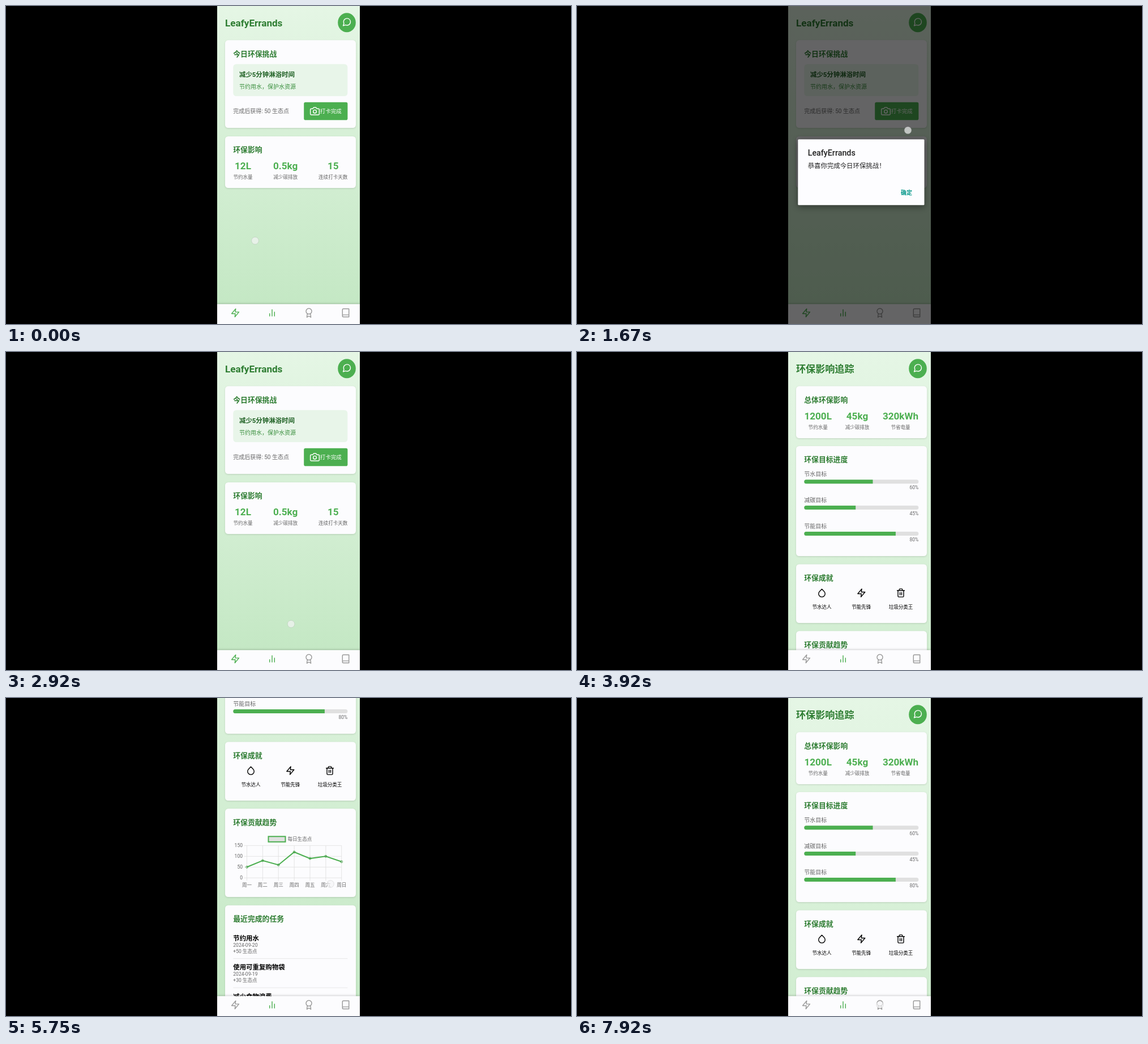
Animation, 998 px wide and 561 px high, one loop 8000 ms. Source, as an HTML page:

```html
<!DOCTYPE html>
<html lang="zh-CN">
<head>
<meta charset="utf-8">
<title>环保挑战</title>
<style>
html, body { margin: 0; width: 100%; height: 100%; overflow: hidden; background: #000; }
svg { display: block; width: 998px; height: 561px; }
text { font-family: Roboto, "Noto Sans CJK SC", "Noto Sans CJK JP", sans-serif; white-space: pre; }
.icon { fill: none; stroke-width: 2; stroke-linecap: round; stroke-linejoin: round; }
.card { fill: #fcfcfe; filter: drop-shadow(0 1.4px 1.5px rgba(0,0,0,.13)); }
.nav { fill: #fcfcfe; filter: drop-shadow(0 -1.4px 1.5px rgba(0,0,0,.12)); }
.alert { fill: #fdfdff; filter: drop-shadow(0 3px 6px rgba(0,0,0,.4)); }
</style>
</head>
<body>
<svg id="stage" viewBox="0 0 998 561"></svg>
<script>
const APP = 'LeafyErrands';
const GREEN = '#4CAF50', DARK = '#2E7D32', GRAY = '#666';
const SCALE = 0.7135, H1 = 17.1, H2 = 12.84, BODY = 11.42, SMALL = 10, TINY = 8.56;
const LOOP = 8000, SCROLL = 297;

const ICONS = {
  zap: 'M13 2L3 14h9l-1 8 10-12h-9l1-8z',
  bars: 'M18 20V10M12 20V4M6 20v-6',
  award: 'M19 8a7 7 0 1 1-14 0a7 7 0 1 1 14 0zM8.21 13.89L7 23l5-3 5 3-1.21-9.12',
  book: 'M4 19.5A2.5 2.5 0 0 1 6.5 17H20M6.5 2H20v20H6.5A2.5 2.5 0 0 1 4 19.5v-15A2.5 2.5 0 0 1 6.5 2z',
  chat: 'M21 11.5a8.38 8.38 0 0 1-.9 3.8 8.5 8.5 0 0 1-7.6 4.7 8.38 8.38 0 0 1-3.8-.9L3 21l1.9-5.7a8.38 8.38 0 0 1-.9-3.8 8.5 8.5 0 0 1 4.7-7.6 8.38 8.38 0 0 1 3.8-.9h.5a8.48 8.48 0 0 1 8 8v.5z',
  camera: 'M23 19a2 2 0 0 1-2 2H3a2 2 0 0 1-2-2V8a2 2 0 0 1 2-2h4l2-3h6l2 3h4a2 2 0 0 1 2 2zM16 13a4 4 0 1 1-8 0a4 4 0 1 1 8 0z',
  drop: 'M12 2.69l5.66 5.66a8 8 0 1 1-11.31 0z',
  trash: 'M3 6h18M19 6v14a2 2 0 0 1-2 2H7a2 2 0 0 1-2-2V6m3 0V4a2 2 0 0 1 2-2h4a2 2 0 0 1 2 2v2M10 11v6M14 11v6'
};

// Text is placed by the vertical centre of its line.
const text = (s, x, y, size, fill = GRAY, weight = 400, anchor = 'start') =>
  `<text x="${x}" y="${y + size * 0.37}" font-size="${size}" fill="${fill}" font-weight="${weight}" text-anchor="${anchor}">${s}</text>`;
const rect = (x, y, w, h, r, attrs) =>
  `<rect x="${x}" y="${y}" width="${w}" height="${h}" rx="${r}" ${attrs}/>`;
const icon = (name, x, y, color) =>
  `<path class="icon" stroke="${color}" transform="translate(${x} ${y}) scale(${SCALE}) translate(-12 -12)" d="${ICONS[name]}"/>`;
const line = (x1, y1, x2, y2, color) =>
  `<path d="M${x1} ${y1}L${x2} ${y2}" stroke="${color}" stroke-width=".75"/>`;
const card = (top, bottom, title) =>
  rect(387, top, 231, bottom - top, 5.5, 'class="card"') + text(title, 401.3, top + 23.7, H2, DARK, 700);
const header = title =>
  text(title, 387, 29.7, H1, DARK, 700) +
  `<ellipse cx="602" cy="29.2" rx="15.8" ry="17" fill="${GREEN}"/>` + icon('chat', 602, 28.3, '#fff');
const stat = ([value, label, x], y) =>
  text(value, x, y, H1, GREEN, 700, 'middle') + text(label, x, y + 19.6, TINY, GRAY, 400, 'middle');
const backdrop = height => rect(373, 0, 252, height, 0, 'fill="url(#leaf)"');

function homePage() {
  const stats = [['12L', '节约水量', 418.5], ['0.5kg', '减少碳排放', 493.7], ['15', '连续打卡天数', 577.7]];
  return backdrop(561) + header(APP) +
    card(60.3, 215, '今日环保挑战') +
    rect(401.3, 102.5, 202, 56.5, 5.5, 'fill="#E8F5E9"') +
    text('减少5分钟淋浴时间', 412, 121, BODY, '#1B5E20', 700) +
    text('节约用水，保护水资源', 412, 142, SMALL, '#388E3C') +
    text('完成后获得: 50 生态点', 401.3, 185.5, SMALL) +
    rect(526.2, 169.8, 77.2, 31.4, 2.8, `fill="${GREEN}"`) +
    icon('camera', 545.5, 185.5, '#fff') +
    text('打卡完成', 554.8, 185.7, 9.5, '#fff') +
    card(230, 321, '环保影响') +
    stats.map(s => stat(s, 282)).join('');
}

function goal(label, percent, y) {
  const width = 202, end = width * percent / 100;
  return text(label, 401.3, y, SMALL) +
    rect(401.3, y + 10, width, 7, 3.5, 'fill="#e0e0e0"') +
    `<path fill="${GREEN}" d="M${401.3 + end} ${y + 10}v7H404.8a3.5 3.5 0 0 1 0 -7z"/>` +
    text(percent + '%', 603.3, y + 23.5, TINY, GRAY, 400, 'end');
}

function chart(top) {
  const left = 425.5, right = 592.7, base = top + 122, step = (right - left) / 6, grid = '#dcdcdc';
  const points = [50, 80, 60, 120, 90, 100, 75].map((v, i) => [left + step * i, base - v * 0.38]);
  let out = rect(463.5, top + 49, 30, 9.5, 0, `fill="#e0e0e0" stroke="${GREEN}" stroke-width="2"`) +
    text('每日生态点', 497.5, top + 53.5, TINY);
  for (let v = 0; v <= 150; v += 50) {
    const y = base - v * 0.38;
    out += line(left - 5, y, right, y, grid) + text(v, 418, y, TINY, GRAY, 400, 'end');
  }
  points.forEach(([x], i) => {
    out += line(x, base - 57, x, base + 5, grid) +
      text('周' + '一二三四五六日'[i], x, base + 12.3, TINY, GRAY, 400, 'middle');
  });
  out += `<polyline points="${points.join(' ')}" fill="none" stroke="${GREEN}" stroke-width="2"/>`;
  return out + points.map(([x, y]) =>
    `<circle cx="${x}" cy="${y}" r="2" fill="#00000019" stroke="${GREEN}" stroke-width=".8"/>`).join('');
}

function impactPage() {
  const stats = [['1200L', '节约水量', 425.7], ['45kg', '减少碳排放', 495], ['320kWh', '节省电量', 571.5]];
  const goals = [['节水目标', 60], ['减碳目标', 45], ['节能目标', 80]];
  const badges = [['drop', '节水达人', 432.5], ['zap', '节能先锋', 502.3], ['trash', '垃圾分类王', 572]];
  const tasks = [['节约用水', 20, 50], ['使用可重复购物袋', 19, 30], ['减少食物浪费', 18, 40]];
  return backdrop(940) + header('环保影响追踪') +
    card(60.3, 152, '总体环保影响') + stats.map(s => stat(s, 113)).join('') +
    card(166, 360, '环保目标进度') + goals.map(([s, p], i) => goal(s, p, 215.2 + 45.9 * i)).join('') +
    card(374.5, 478, '环保成就') +
    badges.map(([name, label, x]) =>
      icon(name, x, 425, '#000') + text(label, x, 450, TINY, '#000', 400, 'middle')).join('') +
    card(492.3, 648, '环保贡献趋势') + chart(492.3) +
    card(662.7, 874, '最近完成的任务') +
    tasks.map(([name, day, gain], i) => {
      const y = 720.5 + 51.4 * i;
      return text(name, 401.3, y, BODY, '#000', 700) +
        text('2024-09-' + day, 401.3, y + 12.3, TINY) +
        text(`+${gain} 生态点`, 401.3, y + 23.3, TINY) +
        line(401.3, y + 36.2, 603.3, y + 36.2, '#e0e0e0');
    }).join('');
}

const stage = document.getElementById('stage');
stage.innerHTML = `
  <defs><linearGradient id="leaf" x2="0" y2="1">
    <stop stop-color="#E5F6E5"/><stop offset="1" stop-color="#C2E7C2"/>
  </linearGradient></defs>
  <g id="home">${homePage()}</g>
  <g id="impact">${impactPage()}</g>
  ${rect(373, 526, 252, 35, 0, 'class="nav"')}
  <g id="zapTab">${icon('zap', 405, 541.3, 'currentColor')}</g>
  ${icon('bars', 470, 541.3, GREEN)}${icon('award', 535, 541.3, '#999')}${icon('book', 600, 541.3, '#999')}
  <g id="dialog">
    ${rect(373, 0, 252, 561, 0, 'fill="#000" opacity=".6"')}
    ${rect(390.3, 235.3, 223.2, 116, 1.5, 'class="alert"')}
    ${text(APP, 407.7, 258.3, 14.27, '#212121', 500)}
    ${text('恭喜你完成今日环保挑战！', 407.7, 281.3, BODY, '#212121')}
    ${text('确定', 572, 329.7, SMALL, '#009688', 700)}
  </g>
  <circle id="touch" r="6.3" fill="#f4f4f6" fill-opacity=".68" stroke="#888" stroke-opacity=".3" stroke-width=".7"/>`;
const [home, impact, zapTab, dialog, touch] =
  ['home', 'impact', 'zapTab', 'dialog', 'touch'].map(id => document.getElementById(id));

// Keys are [time, ...values], joined by smooth steps.
function track(keys, t) {
  const next = keys.findIndex(k => k[0] > t);
  if (next < 0) return keys[keys.length - 1].slice(1);
  if (!next) return keys[0].slice(1);
  const a = keys[next - 1], b = keys[next], p = (t - a[0]) / (b[0] - a[0]), e = p * p * (3 - 2 * p);
  return a.slice(1).map((v, i) => v + (b[i + 1] - v) * e);
}

const touchKeys = [
  [250, 440, 414], [1000, 584.5, 196], [1500, 584.5, 196], [2150, 584.5, 332], [2600, 584.5, 332],
  [3100, 470, 541], [3500, 470, 541], [4350, 560, 440], [4900, 573, 200],
  [5300, 573, 200], [5650, 573, 328], [5850, 573, 328], [6250, 573, 480],
  [6800, 573, 480], [7500, 535, 541]
];
const touchFade = [[3500, 1], [3700, 0], [4200, 0], [4350, 1], [6250, 1], [6400, 0], [6800, 0], [7000, 1]];
const scrollKeys = [[4400, 0], [5150, SCROLL], [5830, SCROLL], [6400, 0]];
const dialogKeys = [[1420, 0], [1580, 1], [2590, 1], [2720, 0]];

function draw(now) {
  const t = now % LOOP, onHome = t < 3250;
  home.style.display = onHome ? '' : 'none';
  impact.style.display = onHome ? 'none' : '';
  zapTab.style.color = onHome ? GREEN : '#999';
  impact.setAttribute('transform', `translate(0 ${-track(scrollKeys, t)[0]})`);
  const shown = track(dialogKeys, t)[0];
  dialog.style.display = shown ? '' : 'none';
  dialog.setAttribute('opacity', shown);
  touch.setAttribute('transform', `translate(${track(touchKeys, t)})`);
  touch.setAttribute('opacity', track(touchFade, t)[0]);
  requestAnimationFrame(() => draw(performance.now()));
}
draw(performance.now());
</script>
</body>
</html>
```
